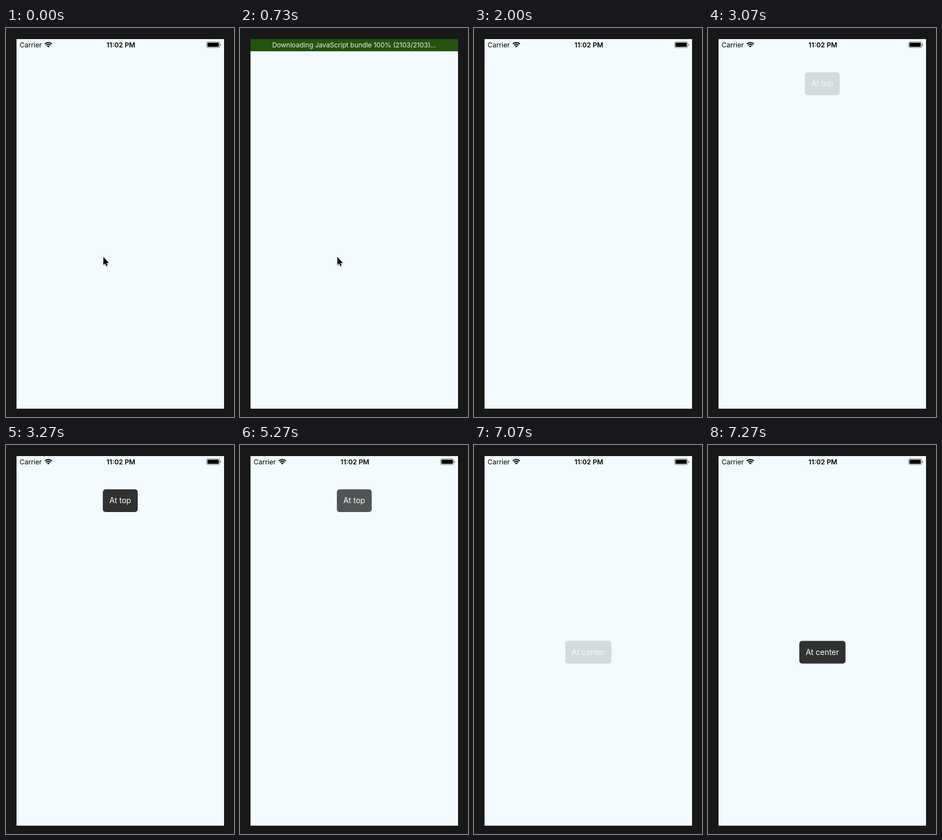
Recreate the animation shown at these times as an HTML page. Size 412 px wide and 702 px high, loop 8 s.

```html
<!DOCTYPE html>
<html lang="en">
<head>
<meta charset="utf-8">
<title>Toast demo</title>
<style>
  html, body { margin: 0; width: 100%; height: 100%; overflow: hidden; background: #181818; }
  svg { display: block; width: 412px; height: 702px; font: 12px Inter, "Liberation Sans", sans-serif; }
  .mid { text-anchor: middle; }
  .toast text { font-size: 14px; fill: #fff; }
  #cursor { filter: drop-shadow(0 1px 1px rgba(0, 0, 0, .35)); }
</style>
</head>
<body>
<svg viewBox="0 0 412 702">
  <clipPath id="screen"><rect x="19" y="20" width="375" height="667"/></clipPath>
  <g clip-path="url(#screen)">
    <rect x="19" y="20" width="375" height="667" fill="#f3fbff"/>

    <text x="24.5" y="34.8" font-size="12.3">Carrier</text>
    <g transform="translate(76.5 35.3)">
      <path d="M0 0L-2.3 -2.3A3.2 3.2 0 0 1 2.3 -2.3Z"/>
      <path d="M-4 -4A5.6 5.6 0 0 1 4 -4M-6.4 -6.4A9 9 0 0 1 6.4 -6.4" fill="none" stroke="#000" stroke-width="2"/>
    </g>
    <text class="mid" x="207.5" y="34.8" font-size="12.2" font-weight="600">11:02 PM</text>
    <rect x="362.5" y="25" width="23.5" height="10.5" rx="2.2" fill="none" stroke="#777" stroke-width="1"/>
    <rect x="364" y="26.5" width="20.5" height="7.5" rx="1"/>
    <path d="M387 28.5q1.5 .5 1.5 1.75t-1.5 1.75z" fill="#666"/>

    <g class="toast" id="top">
      <rect x="175" y="80" width="63" height="41" rx="5"/>
      <text class="mid" x="206.5" y="105.4">At top</text>
    </g>
    <g class="toast" id="center">
      <rect x="165" y="353.5" width="83.5" height="41" rx="5"/>
      <text class="mid" x="206.7" y="379">At center</text>
    </g>

    <g id="banner">
      <rect x="19" y="20" width="375" height="22" fill="#24530f"/>
      <text class="mid" x="206.3" y="35.3" fill="#eef2ec">Downloading JavaScript bundle 100% (2103/2103)...</text>
    </g>
    <path id="cursor" d="M176 413.3V427.6L179.2 424.8L181.3 429.6L183.5 428.6L181.4 424H185.8Z" stroke="#fff" stroke-width="1" paint-order="stroke"/>
  </g>
</svg>
<script>
  const LOOP = 8000, FPS = 15;
  const el = id => document.getElementById(id);
  const clamp = x => Math.min(1, Math.max(0, x));
  const easeIn = x => x ** 1.6;
  const easeOut = x => 1 - easeIn(1 - x);
  const easeInOut = x => x * x * (3 - 2 * x);
  const progress = (t, start, length) => clamp((t - start) / length);

  const toastOpacity = (t, show, hide) =>
    .8 * easeOut(progress(t, show, 200)) * (1 - easeIn(progress(t, hide, 200)));

  function draw(now) {
    const t = Math.floor((now % LOOP + 5) * FPS / 1000) * 1000 / FPS;
    el("top").setAttribute("opacity", toastOpacity(t, 3047, 5200));
    el("center").setAttribute("opacity", toastOpacity(t, 7047, LOOP * 2));

    const lift = 22 * easeInOut(progress(t, 1200, 250));
    el("banner").setAttribute("transform", `translate(0 ${-lift})`);
    el("banner").setAttribute("visibility", t > 660 && lift < 22 ? "visible" : "hidden");

    el("cursor").setAttribute("opacity", 1 - progress(t, 933, 200));
  }

  const begin = performance.now();
  function tick() {
    draw(performance.now() - begin);
    requestAnimationFrame(tick);
  }
  tick();
</script>
</body>
</html>
```
